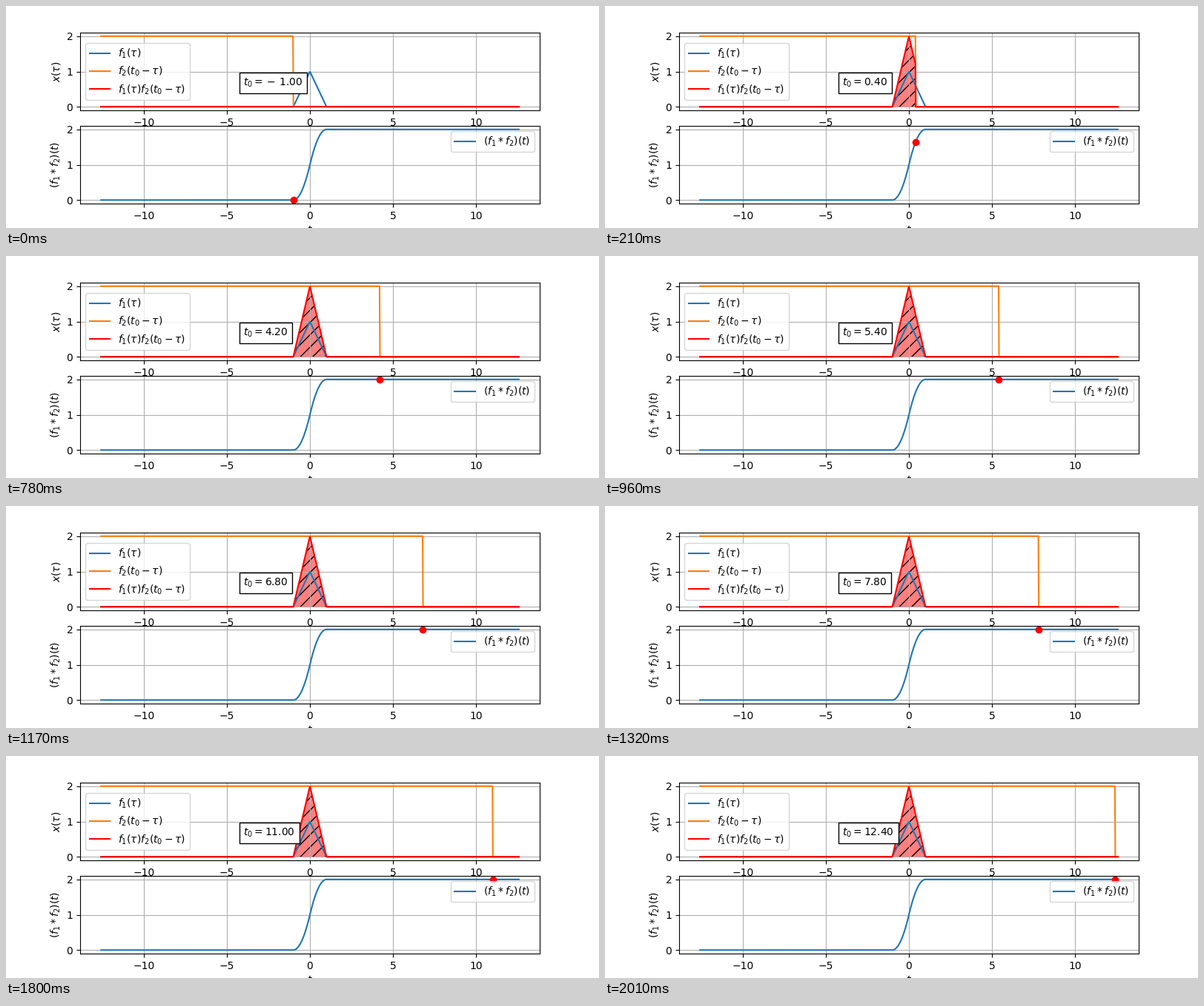
Animation, 800 px wide and 300 px high, one loop 2.04 s. Source, as a matplotlib script:

```python
import numpy as np
import matplotlib.pyplot as plt
from matplotlib.animation import FuncAnimation

FRAMES = 68
STEP_MS = 30
tau = np.linspace(-4 * np.pi, 4 * np.pi, 1000)


def triangle(x):
    return np.maximum(0, 1 - np.abs(x))


def step(x):
    return 2.0 * (x >= 0)


def convolution(t):
    """Closed form of triangle * step."""
    t = np.clip(t, -1, 1)
    return 1 + 2 * t - t * np.abs(t)


fig, (top, bottom) = plt.subplots(2, 1, figsize=(8, 3), dpi=100)

top.plot(tau, triangle(tau), label=r"$f_1(\tau)$")
shifted, = top.plot(tau, step(-1 - tau), label=r"$f_2(t_0-\tau)$")
product, = top.plot(tau, 0 * tau, "r", label=r"$f_1(\tau)f_2(t_0-\tau)$")
readout = top.text(-4, 0.6, "", bbox=dict(facecolor="white"))
top.set_xlabel(r"$\tau$")
top.set_ylabel(r"$x(\tau)$")
top.legend(loc="center left")

bottom.plot(tau, convolution(tau), label=r"$(f_1 * f_2)(t)$")
dot, = bottom.plot([], [], "ro")
bottom.set_xlabel("$t$")
bottom.set_ylabel(r"$(f_1 * f_2)(t)$")
bottom.legend(loc="upper right")

for ax in (top, bottom):
    ax.grid(True)
    ax.set_xlim(1.1 * tau[0], 1.1 * tau[-1])
    ax.set_ylim(-0.1, 2.1)
    ax.set_xticks(range(-10, 11, 5))
    ax.set_yticks([0, 1, 2])

area = None


def update(i):
    global area
    t0 = -1 + 0.2 * i
    edge = step(t0 - tau)
    overlap = triangle(tau) * edge
    shifted.set_ydata(edge)
    product.set_ydata(overlap)
    if area is not None:
        area.remove()
    area = top.fill_between(tau, overlap, facecolor="r", alpha=0.5, hatch="//")
    sign = r"-\," if t0 < 0 else ""
    readout.set_text(rf"$t_0 = {sign}{abs(t0):.2f}$")
    dot.set_data([t0], [convolution(t0)])
    return shifted, product, area, readout, dot


anim = FuncAnimation(fig, update, frames=FRAMES, interval=STEP_MS,
                     init_func=lambda: update(0), repeat=True, repeat_delay=0)
plt.show()
```
